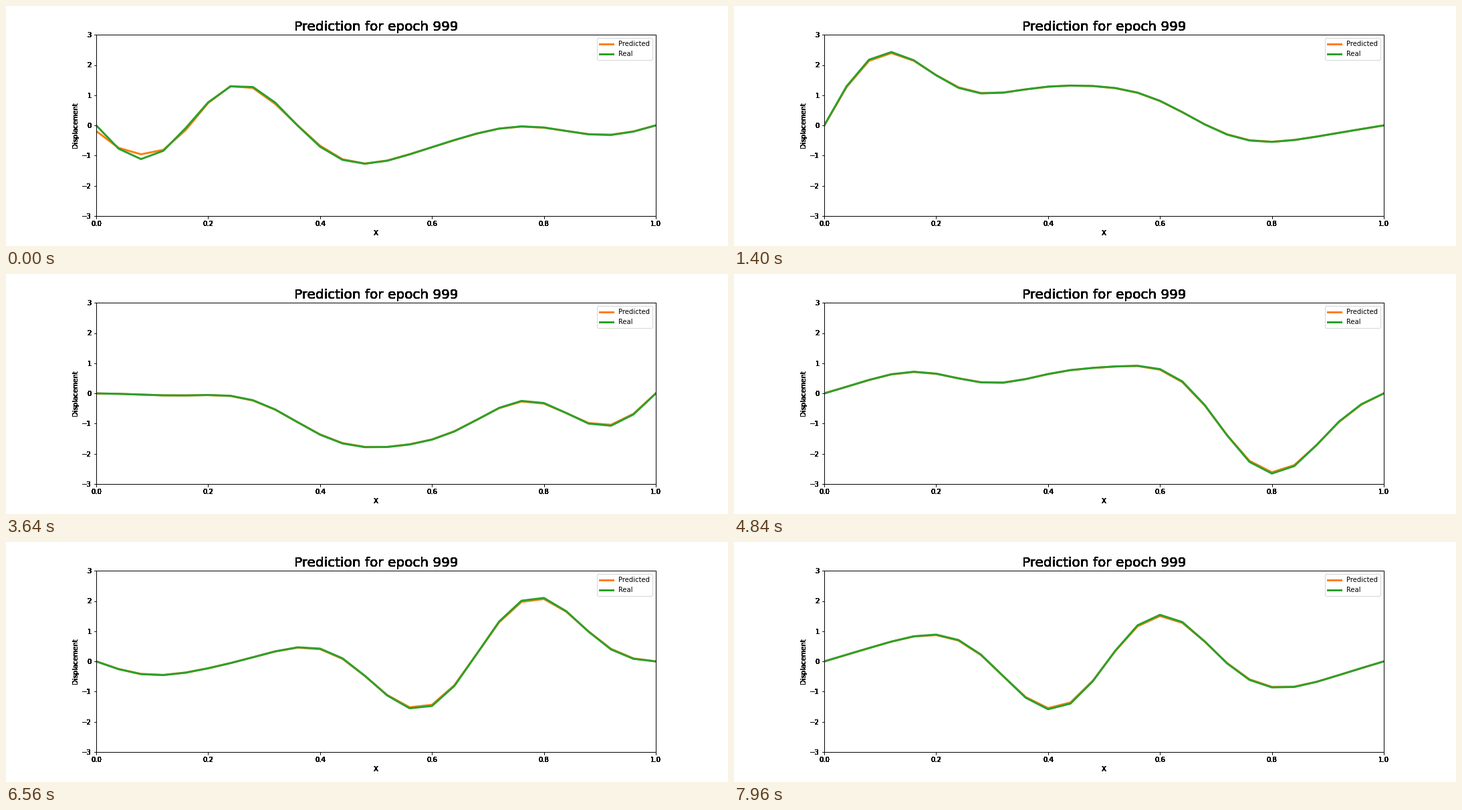
Animation of 1080x360 px, one loop 8 s. Source, as a matplotlib script:

```python
import numpy as np
import matplotlib.pyplot as plt
from matplotlib.animation import FuncAnimation

FRAMES, INTERVAL = 200, 40
OMEGA = 0.92    # angular speed of the lowest string mode, rad/s
MEMORY = 1.6    # seconds over which a mode's swing drifts
SMOOTHING = 0.001

# Key poses of the string: time in seconds -> amplitudes of sin(k pi x), k = 1, 2, ...
POSES = {
    0.00: [-.38, .31, .38, -.19, -.70, -.38, -.22, -.01],
    1.40: [1.06, 1.02, .10, .54, .49, .20, .17, .07],
    2.44: [.46, -1.88, -.34, -.63, .06, -.07, .02, -.05],
    3.64: [-1.19, .25, .38, .16, -.38, .16, -.16, .11],
    4.84: [.08, 1.06, -.88, .63, .13, -.21, .22, -.16],
    6.56: [.04, -.46, .74, -.78, -.33, .49, -.22, -.02],
    7.96: [-.01, .02, .05, 1.06, -.07, -.54, .03, .09],
}


def kernel(a, b, k):
    gap = np.subtract.outer(a, b)
    return np.cos(k * OMEGA * gap) * np.exp(-0.5 * (gap / MEMORY) ** 2)


def swing(k, amplitudes):
    """Oscillation of mode k at its own pitch, passing through the key poses."""
    weights = np.linalg.solve(kernel(keys, keys, k), amplitudes)
    return kernel(time, keys, k) @ weights


keys = np.array(list(POSES))
time = np.arange(FRAMES) * INTERVAL / 1000
x = np.linspace(0, 1, 26)
poses = np.array(list(POSES.values()))
orders = np.arange(1, poses.shape[1] + 1)
modes = np.sin(np.pi * np.outer(orders, x))
motion = np.array([swing(k, poses[:, k - 1]) for k in orders]).T
real = motion @ modes

# The prediction is slightly too smooth and starts off wrong at the left end
predicted = (motion * np.exp(-SMOOTHING * orders ** 2)) @ modes
start_error = -.19 * np.cos(12.5 * np.pi * x) * np.exp(-6 * x)
predicted += np.outer(np.exp(-time / .4), start_error)


def thicken(artist, times):
    """Paint an artist several times so its soft edges turn solid."""
    paint = artist.draw

    def draw(renderer):
        for _ in range(times):
            paint(renderer)

    artist.draw = draw


fig, ax = plt.subplots(figsize=(15, 5), dpi=72, facecolor="white")
fig.subplots_adjust(left=.125, right=.9, bottom=.125, top=.88)
ax.set(xlim=(0, 1), ylim=(-3, 3), xlabel="X", ylabel="Displacement")
ax.set_xticks(np.linspace(0, 1, 6))
ax.set_yticks(range(-3, 4))
ax.set_title("Prediction for epoch 999", fontsize=20)

ticks = ax.xaxis.get_major_ticks() + ax.yaxis.get_major_ticks()
for text in [t.label1 for t in ticks] + [ax.title, ax.xaxis.label, ax.yaxis.label]:
    thicken(text, 16)
for stroke in [t.tick1line for t in ticks] + list(ax.spines.values()):
    thicken(stroke, 3)

predicted_line, = ax.plot(x, predicted[0], color="#ff7f0e", lw=3, label="Predicted")
real_line, = ax.plot(x, real[0], color="#2ca02c", lw=3, label="Real")
ax.legend(loc="upper right")


def update(n):
    predicted_line.set_ydata(predicted[n])
    real_line.set_ydata(real[n])
    return predicted_line, real_line


anim = FuncAnimation(fig, update, frames=FRAMES, interval=INTERVAL,
                     repeat=True, repeat_delay=0)
plt.show()
```
